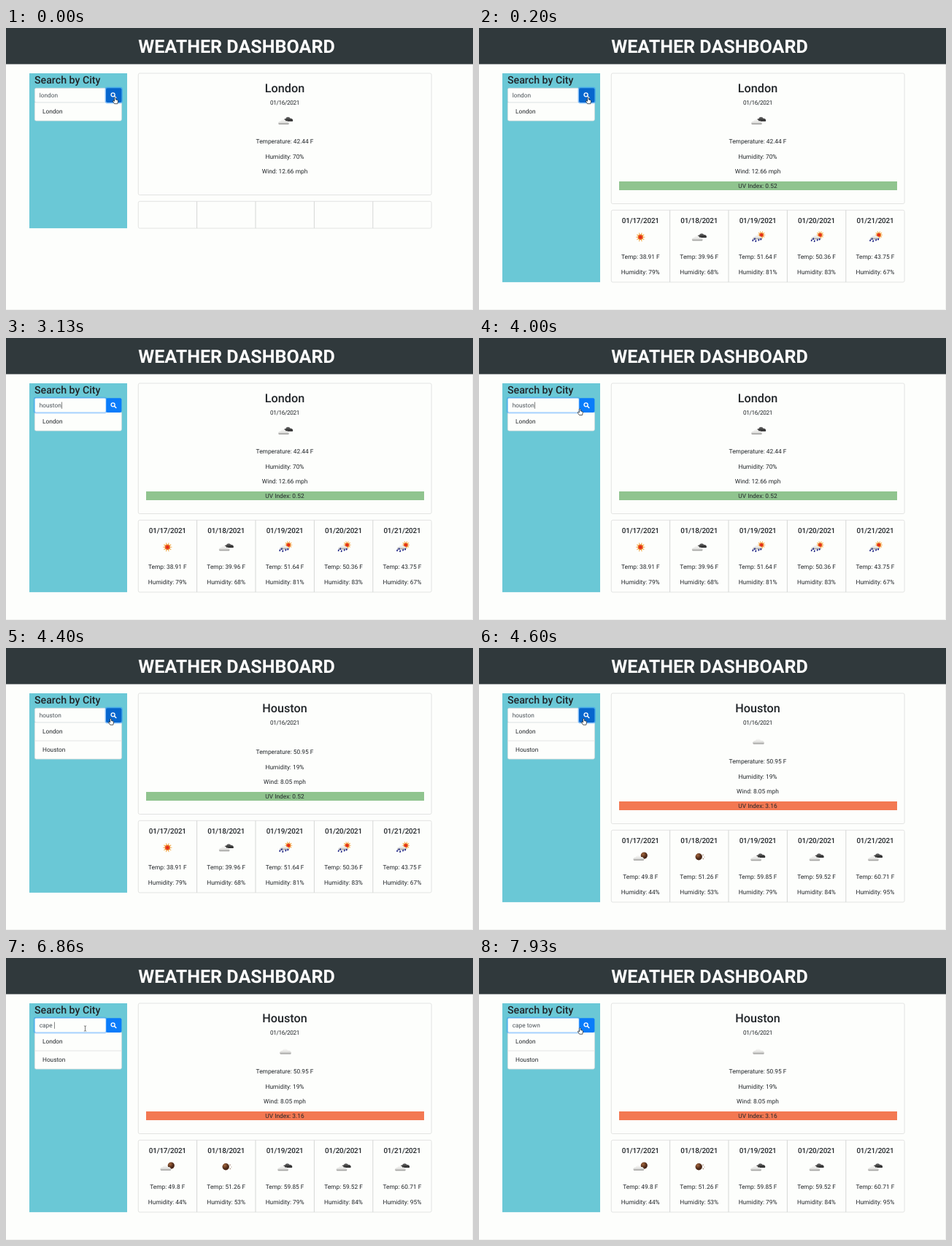
Animation of 640x386 px, one loop 8000 ms. Source, as an HTML page:

```html
<!DOCTYPE html>
<html lang="en">
<head>
<meta charset="utf-8">
<title>Weather Dashboard</title>
<style>
  html, body { margin: 0; width: 100%; height: 100%; overflow: hidden; background: #fdfefc; }
  svg { display: block; width: 640px; height: 386px; }
  text { font: 400 8.35px Roboto, sans-serif; fill: #212529; white-space: pre; text-rendering: geometricPrecision; }
  .mid { text-anchor: middle; }
  .title { font-size: 25.1px; font-weight: 700; fill: #fff; }
  .city { font-size: 16.2px; font-weight: 500; }
  .label { font-size: 14.2px; font-weight: 500; }
  .date { font-size: 8.2px; letter-spacing: -.36px; }
  .day { font-size: 9.9px; font-weight: 500; letter-spacing: -.18px; }
  .field { font-size: 8.25px; fill: #495057; }
  .item { font-size: 8.25px; }
  .card { fill: #fdfefc; stroke: #dcdedc; stroke-width: .8; }
</style>
</head>
<body>
<svg viewBox="0 0 640 386">
  <defs>
    <linearGradient id="pale" x2="0" y2="1">
      <stop offset=".1" stop-color="#f7f7f5"/><stop offset=".65" stop-color="#dededc"/><stop offset="1" stop-color="#8b8b89"/>
    </linearGradient>
    <linearGradient id="dark" x2="0" y2="1">
      <stop offset="0" stop-color="#6a6a6a"/><stop offset="1" stop-color="#222"/>
    </linearGradient>
    <radialGradient id="fire">
      <stop offset=".35" stop-color="#e2281c"/><stop offset="1" stop-color="#f08a28"/>
    </radialGradient>
    <radialGradient id="brown" cx=".35" cy=".3">
      <stop offset="0" stop-color="#a4663c"/><stop offset="1" stop-color="#4b2817"/>
    </radialGradient>
    <path id="puff" d="M1 0C-1-2 1-4.4 3.2-4C4-7.4 9-7.4 10-4.4C13-5 15.2-2 13.6 0Z"/>
  </defs>
  <rect width="640" height="386" fill="#fdfefc"/>
  <path d="M639.5 50V385.5H0" fill="none" stroke="#f1f2f0"/>
  <rect width="640" height="49.5" fill="#30393c"/>
  <text class="title mid" x="316" y="34">WEATHER DASHBOARD</text>
  <g id="side"></g>
  <g id="main"></g>
  <text id="probe" class="field" visibility="hidden"></text>
  <g id="mouse"></g>
</svg>
<script>
const LOOP = 8000, STEP = 1000 / 15;
const $ = id => document.getElementById(id);

const reports = [
  { city: 'London', icon: 'broken', temp: '42.44', hum: 70, wind: '12.66' },
  { city: 'Houston', icon: 'cloud', temp: '50.95', hum: 19, wind: '8.05' }
];
const outlooks = [
  { uv: '0.52', color: '#90c48f', temps: [38.91, 39.96, 51.64, 50.36, 43.75], hums: [79, 68, 81, 83, 67],
    icons: ['sun', 'broken', 'rain', 'rain', 'rain'] },
  { uv: '3.16', color: '#f37852', temps: [49.8, 51.26, 59.85, 59.52, 60.71], hums: [44, 53, 79, 84, 95],
    icons: ['moonCloud', 'moon', 'broken', 'broken', 'broken'] }
];

// [time, x, y]
const route = [
  [0, 149.5, 95], [690, 149.5, 95], [1200, 99, 99], [3340, 99, 99], [4180, 143.5, 96.5],
  [5270, 143.5, 96.5], [5530, 117, 96], [5670, 108.5, 96.5], [7670, 108.5, 96.5], [7930, 138.5, 95.5], [LOOP, 138.5, 95.5]
];
const keyTimes = [
  ['houston', [2260, 2530, 2660, 2730, 2860, 3000, 3130]],
  ['cape town', [6330, 6460, 6530, 6660, 6860, 7000, 7060, 7260, 7330]]
];

const text = (x, y, s, cls = 'mid') => `<text class="${cls}" x="${x}" y="${y}">${s}</text>`;
const rect = (x, y, w, h, attrs) => `<rect x="${x}" y="${y}" width="${w}" height="${h}" ${attrs}/>`;
const line = (d, attrs) => `<path d="${d}" fill="none" ${attrs}/>`;
const puff = (x, y, s, tone) =>
  `<use href="#puff" transform="translate(${x} ${y}) scale(${s})" fill="url(#${tone})"/>`;
const disc = (x, y, r, fill) => `<circle cx="${x}" cy="${y}" r="${r}" fill="${fill}"/>`;

function sun(x, y, r) {
  let rays = '';
  for (let i = 0; i < 10; i++) {
    const a = i * Math.PI / 5;
    rays += `M${x} ${y}l${(Math.cos(a) * r * 1.65).toFixed(2)} ${(Math.sin(a) * r * 1.65).toFixed(2)}`;
  }
  return line(rays, 'stroke="#f3ad4c" stroke-width="1.1"') + disc(x, y, r, 'url(#fire)');
}

function drops() {
  return [[-7, 5], [-3, 6], [1, 4.5], [-4.5, 3], [4, 3.5]].map(([x, y]) =>
    `<path d="M${x + .6} ${y - 2.6}Q${x + 2} ${y + .6} ${x} ${y + .8}Q${x - 1.8} ${y + .4} ${x + .6} ${y - 2.6}Z" fill="#1b2182"/>`).join('');
}

const icons = {
  cloud: () => puff(-8, 4.6, 1.12, 'pale'),
  broken: () => puff(-2.5, .8, .9, 'dark') + puff(-10, 5, 1.05, 'pale'),
  sun: () => sun(0, 0, 3.7),
  rain: () => sun(5, -3, 3.1) + puff(-7, 3, .9, 'pale') + drops(),
  moon: () => disc(-.5, -.6, 4.7, 'url(#brown)') + disc(5.3, -3, .7, '#8b6a50') +
    disc(7.2, -.4, .5, '#8b6a50') + disc(5.5, 2.2, .7, '#8b6a50'),
  moonCloud: () => disc(5, -2.2, 4.6, 'url(#brown)') + puff(-10, 4.5, 1.05, 'pale')
};
const icon = (name, x, y) => `<g transform="translate(${x} ${y})">${icons[name]()}</g>`;

function pointer(t) {
  const i = Math.max(1, route.findIndex(k => k[0] > t));
  const [a, b] = [route[i - 1], route[i]];
  const p = (t - a[0]) / (b[0] - a[0]), e = p * p * (3 - 2 * p);
  return { x: a[1] + (b[1] - a[1]) * e, y: a[2] + (b[2] - a[2]) * e };
}

function typed(t) {
  let s = 'london';
  for (const [word, times] of keyTimes) {
    const n = times.filter(k => t >= k).length;
    if (n) s = word.slice(0, n);
  }
  return s;
}

function drawSide(t, bottom, at) {
  const focus = (t >= 1260 && t < 4180) || t >= 5730;
  const chosen = (t >= 1330 && t < 2260) || (t >= 5800 && t < 6330);
  const cities = t >= 4260 ? ['London', 'Houston'] : ['London'];
  const hover = at.x > 139 && (t < 1200 || t > 3400);
  const value = typed(t), listH = 25 * cities.length;
  $('probe').textContent = value;
  const w = $('probe').getComputedTextLength();

  let s = rect(32, 62, 134, bottom - 62, 'fill="#6ac8d6"') + text(39, 75.5, 'Search by City', 'label');
  s += rect(39.4, 101, 119, listH + 1, 'rx="2" class="card"');
  cities.forEach((c, i) => {
    if (i) s += line(`M39.4 ${102 + 25 * i}H158.4`, 'stroke="#dcdedc" stroke-width=".8"');
    s += text(50, 117.4 + 25 * i, c, 'item');
  });
  const fill = hover ? '#0766ce' : focus ? '#0a7cfa' : '#0a70df';
  const button = rect(137, 82.3, 21.4, 19.6, `rx="2" fill="${fill}"`);
  const field = rect(39.4, 82.3, 97.6, 19.6,
    `rx="2" fill="#fdfefc" stroke="${focus ? '#80bdff' : '#ced4da'}" stroke-width=".7"`);
  if (focus) s += button + rect(38.6, 81.5, 99.2, 21.2, 'rx="2.6" fill="none" stroke="#007bff" stroke-opacity=".28" stroke-width="1.7"') + field;
  else s += field + rect(136.4, 81.6, 22.6, 21, 'rx="2.6" fill="none" stroke="#268fff" stroke-opacity=".5" stroke-width="1.7"') + button;
  s += `<circle cx="146.6" cy="91.3" r="2.5" fill="none" stroke="#fff" stroke-width="1.3"/>` +
    line('M148.5 93.2L150.8 95.5', 'stroke="#fff" stroke-width="1.6" stroke-linecap="round"');
  if (chosen) s += rect(45.8, 87.2, w, 10, 'fill="#add0f3"');
  s += text(45.8, 95.2, value, 'field');
  if (focus && !chosen && t < 7530) s += rect(46.1 + w, 87.6, .6, 9.2, 'fill="#333"');
  $('side').innerHTML = s;
}

function drawMain(t) {
  const now = reports[t >= 4260 ? 1 : 0], next = outlooks[t >= 4530 ? 1 : 0];
  const ready = t >= 60;
  const hasIcon = t < 4260 || t >= 4460;
  const dayIcons = t >= 130 && !(t >= 4530 && t < 4590);
  const up = hasIcon ? 0 : 13;
  const end = 240.5 - up - (ready ? 0 : 12);
  const top = end + 8.8;
  const height = !ready ? 36.8 : dayIcons ? 98.6 : 85.6;

  let s = rect(181.3, 62, 401.8, end - 62, 'rx="2" class="card"') +
    text(382, 88.4, now.city, 'mid city') + text(382, 104.7, '01/16/2021', 'mid date');
  if (hasIcon) s += icon(now.icon, 383, 127);
  s += text(382, 158.3 - up, `Temperature: ${now.temp} F`) +
    text(382, 178.6 - up, `Humidity: ${now.hum}%`) +
    text(382, 198.9 - up, `Wind: ${now.wind} mph`);
  if (ready) s += rect(192, 210 - up, 381, 12, `fill="${next.color}"`) +
    text(382, 219.1 - up, `UV Index: ${next.uv}`);

  s += rect(181.3, top, 401.8, height, 'rx="2" class="card"');
  for (let i = 0; i < 5; i++) {
    const x = 221.3 + 80.4 * i, drop = dayIcons ? 0 : 13;
    if (i) s += line(`M${x - 40.1} ${top}v${height}`, 'stroke="#d5d7d5"');
    if (!ready) continue;
    s += text(x, top + 18.1, `01/${17 + i}/2021`, 'mid day');
    if (dayIcons) s += icon(next.icons[i], x, top + 37);
    s += text(x, top + 67 - drop, `Temp: ${next.temps[i]} F`) +
      text(x, top + 87.2 - drop, `Humidity: ${next.hums[i]}%`);
  }
  $('main').innerHTML = s;
  return top + height;
}

function drawMouse(t, at) {
  const hidden = t >= 2260 && t < 3400;
  const hand = '<path d="M-.9.7Q0-.7.9.7V3L3 3.6Q4.3 4 4 5.6L3.3 8.7H-.8L-3 5.5Q-3.1 4.1-1.8 4.7L-.9 5.3Z" fill="#fff" stroke="#111" stroke-width=".7"/>';
  const beam = line('M-1.6-3.6Q0-3.6 0-2.8Q0-3.6 1.6-3.6M0-2.8V2.8M-1.6 3.6Q0 3.6 0 2.8Q0 3.6 1.6 3.6', 'stroke="#444" stroke-width=".7"');
  $('mouse').innerHTML = hidden ? '' :
    `<g transform="translate(${at.x.toFixed(2)} ${at.y.toFixed(2)})">${at.x > 137 ? hand : beam}</g>`;
}

let last = -1;
const start = performance.now();
function frame() {
  const t = (performance.now() - start) % LOOP;
  // the screen refreshes 15 times a second
  const n = Math.floor((t + 7) / STEP) % Math.round(LOOP / STEP);
  if (n !== last) {
    last = n;
    const now = n * STEP, at = pointer(now);
    drawSide(now, drawMain(now), at);
    drawMouse(now, at);
  }
  requestAnimationFrame(frame);
}
frame();
</script>
</body>
</html>
```
